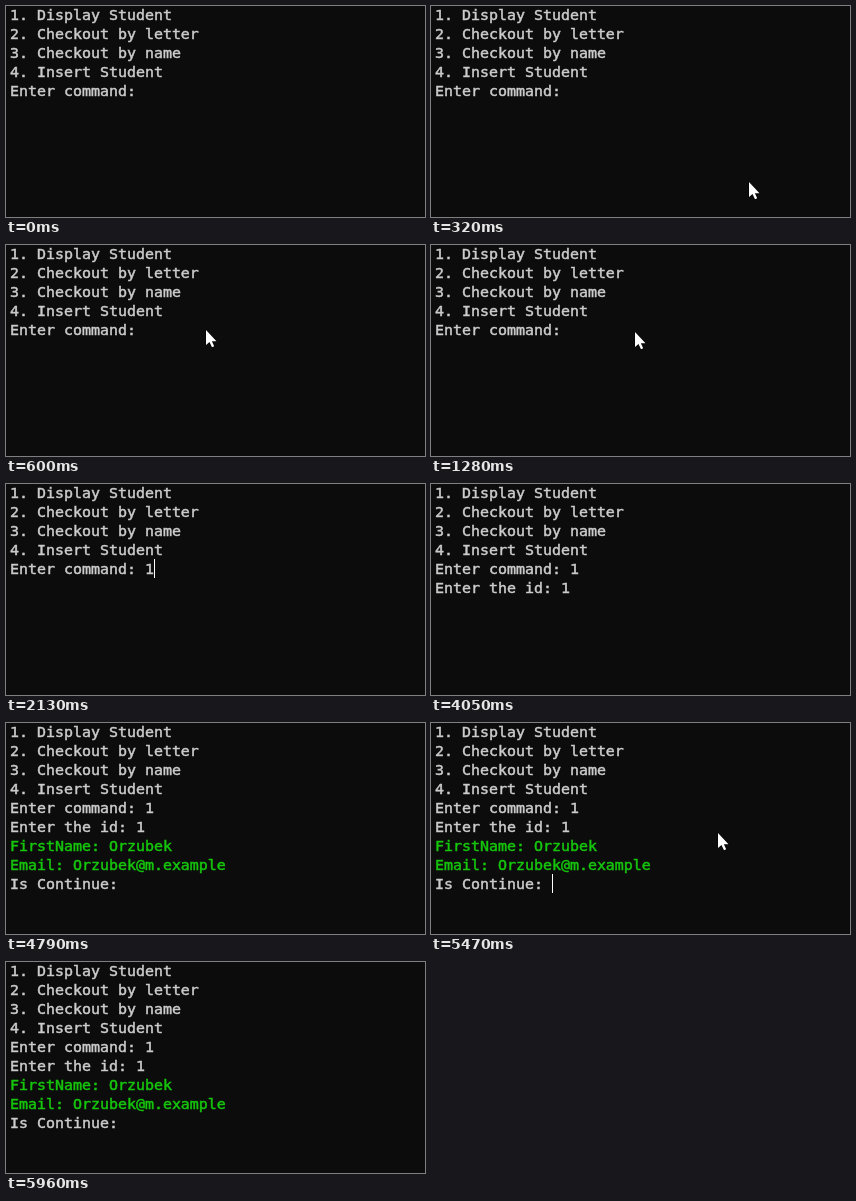
An HTML page for the animation above (6.22 s loop, 419 px wide and 211 px high).

```html
<!DOCTYPE html>
<html lang="en">
<head>
<meta charset="utf-8">
<title>Student console</title>
<style>
  html, body { margin: 0; width: 100%; height: 100%; overflow: hidden; background: #0c0c0c; }
  svg { display: block; width: 419px; height: 211px; }
  text { font: 14.95px "DejaVu Sans Mono", monospace; fill: #ccc; stroke: #ccc; stroke-width: .5px; }
  .green { fill: #16c60c; stroke: #16c60c; }

  .step { animation: 6220ms step-end infinite; }
  .command { animation-name: command; }
  .prompt { animation-name: prompt; }
  .id { animation-name: id; }
  .result { animation-name: result; }
  .caret { animation-name: caret; fill: #fff; }
  .pointer { animation-name: pointer; fill: #fff; stroke: #000; paint-order: stroke; }

  @keyframes command { 0% { opacity: 0 } 34.24%, 100% { opacity: 1 } }
  @keyframes prompt { 0% { opacity: 0 } 39.71%, 100% { opacity: 1 } }
  @keyframes id { 0% { opacity: 0 } 54.5%, 100% { opacity: 1 } }
  @keyframes result { 0% { opacity: 0 } 67.2%, 100% { opacity: 1 } }

  /* Blinks in place; parked above the stage while off */
  @keyframes caret {
    0%, 20.57%, 38.58%, 51.28%, 65.11%, 77%, 94.69%, 100% { transform: translate(0, -40px) }
    12.86%, 30.06% { transform: translate(139px, 75px) }
    34.24% { transform: translate(148px, 75px) }
    41.8% { transform: translate(130px, 94px) }
    54.5% { transform: translate(139px, 94px) }
    67.2%, 85.69% { transform: translate(121px, 151px) }
  }

  /* Sweeps in from the lower right, hides while typing, then sweeps out */
  @keyframes pointer {
    0%, 34.24%, 39.71%, 95.81%, 100% { transform: translate(0, -40px) }
    3.05% { transform: translate(349px, 201px) }
    4.18% { transform: translate(318px, 176px) }
    5.3% { transform: translate(277px, 140px) }
    6.43% { transform: translate(238px, 104px) }
    7.39% { transform: translate(214px, 80px) }
    8.52% { transform: translate(203px, 72px) }
    9.64% { transform: translate(200px, 85px) }
    11.73% { transform: translate(201px, 87px) }
    12.86% { transform: translate(203px, 87px) }
    19.29%, 38.58%, 83.44% { transform: translate(204px, 87px) }
    84.56% { transform: translate(207px, 82px) }
    85.69% { transform: translate(220px, 76px) }
    86.81% { transform: translate(249px, 86px) }
    87.94% { transform: translate(287px, 110px) }
    89.06% { transform: translate(326px, 140px) }
    90.19% { transform: translate(356px, 167px) }
    91.31% { transform: translate(375px, 187px) }
    92.44% { transform: translate(385px, 198px) }
    93.56% { transform: translate(386px, 203px) }
    94.69% { transform: translate(387px, 207px) }
  }
</style>
</head>
<body>
<svg viewBox="0 0 419 211">
  <text x="4" y="14">1. Display Student</text>
  <text x="4" y="33">2. Checkout by letter</text>
  <text x="4" y="52">3. Checkout by name</text>
  <text x="4" y="71">4. Insert Student</text>
  <text x="4" y="90">Enter command:</text>
  <text x="139" y="90" class="step command">1</text>
  <text x="4" y="109" class="step prompt">Enter the id:</text>
  <text x="130" y="109" class="step id">1</text>
  <g class="step result">
    <text x="4" y="128" class="green">FirstName: Orzubek</text>
    <text x="4" y="147" class="green">Email: Orzubek@m.example</text>
    <text x="4" y="166">Is Continue:</text>
  </g>
  <rect class="step caret" width="1" height="19"/>
  <path class="step pointer" d="M0 0V15L3.5 12L6 17.3L8.2 16.3L5.9 11.2H10.5Z"/>
</svg>
</body>
</html>
```
